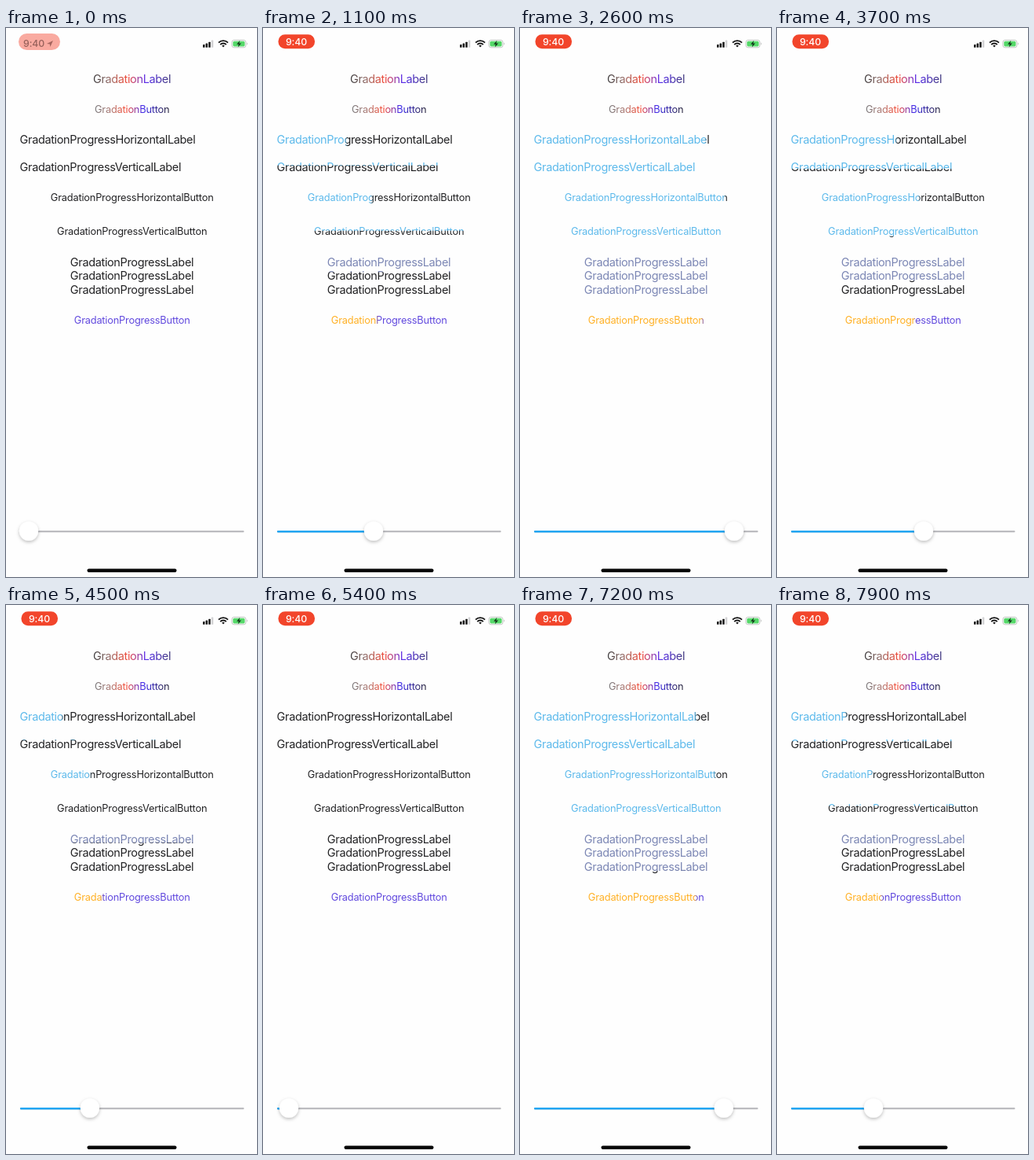
An HTML page for the animation above (8 s loop, 320 px wide and 698 px high).

```html
<!DOCTYPE html>
<html lang="en">
<head>
<meta charset="utf-8">
<title>Gradation progress</title>
<style>
html, body { margin: 0; width: 100%; height: 100%; overflow: hidden; background: #fefefe; }
svg { display: block; width: 320px; height: 698px; }
.soft { filter: blur(.35px); }
text { font-family: Inter, Roboto, sans-serif; fill: #222224; }
.label { font-size: 14.5px; letter-spacing: -.36px; }
.button { font-size: 12.8px; letter-spacing: -.2px; }
.mid { text-anchor: middle; }
.time { font-size: 12.3px; font-weight: 500; letter-spacing: -.1px; }
</style>
</head>
<body>
<svg viewBox="0 0 320 698">
  <defs>
    <linearGradient id="labelFill" gradientUnits="userSpaceOnUse" x1="111" x2="210">
      <stop offset="0" stop-color="#3a3a3c"/>
      <stop offset=".2" stop-color="#94706c"/>
      <stop offset=".45" stop-color="#f44a38"/>
      <stop offset=".68" stop-color="#5a30f0"/>
      <stop offset="1" stop-color="#40387c"/>
    </linearGradient>
    <linearGradient id="buttonFill" gradientUnits="userSpaceOnUse" x1="113" x2="209">
      <stop offset="0" stop-color="#77777a"/>
      <stop offset=".22" stop-color="#b07c76"/>
      <stop offset=".43" stop-color="#f84a34"/>
      <stop offset=".64" stop-color="#3f2cf0"/>
      <stop offset="1" stop-color="#2a2838"/>
    </linearGradient>
    <filter id="shadow" x="-50%" y="-50%" width="200%" height="200%">
      <feDropShadow dx="0" dy="1.8" stdDeviation="2" flood-color="#000" flood-opacity=".27"/>
    </filter>
  </defs>
  <rect width="320" height="698" fill="#fefefe"/>
  <g id="screen" class="soft">
    <g id="pillFaded">
      <rect x="16" y="7" width="53" height="21" rx="10.5" fill="#f9aaa0"/>
      <text class="time" x="22" y="24.4" style="fill:#96605a">9:40</text>
      <path d="M52 20l8-4-3.6 8-.6-3.6z" fill="#a5655e"/>
    </g>
    <g id="pill">
      <rect x="19.5" y="8.3" width="46.5" height="18" rx="8.5" fill="#f2452b"/>
      <text class="time mid" x="42.5" y="21.6" style="fill:#fff">9:40</text>
    </g>

    <g fill="#161616">
      <rect x="251" y="21" width="2.5" height="3.8" rx=".6"/>
      <rect x="254.6" y="19.6" width="2.5" height="5.2" rx=".6"/>
      <rect x="258.2" y="17.7" width="2.5" height="7.1" rx=".6"/>
      <rect x="261.8" y="15.6" width="2.5" height="9.2" rx=".6" fill="#d2d2d4"/>
    </g>
    <g fill="none" stroke="#161616" stroke-width="1.9">
      <path d="M271 18.6a8.6 8.6 0 0 1 12 0"/>
      <path d="M273.2 21.1a5.4 5.4 0 0 1 7.6 0"/>
      <path d="M275.2 22.6a2.6 2.6 0 0 1 3.6 0L277 24.6z" fill="#161616" stroke="none"/>
    </g>
    <rect x="287.9" y="15.4" width="18" height="9.4" rx="2.8" fill="#fff" stroke="#b4b8b4" stroke-width=".8"/>
    <rect x="289.3" y="16.8" width="15.2" height="6.6" rx="1.6" fill="#55d869"/>
    <path d="M307 18.4q1.6 1.7 0 3.4z" fill="#b4b8b4"/>
    <path d="M298.3 15.8l-4.2 4.9h2.6l-1 3.9 4.2-5h-2.7z" fill="#123018"/>

    <text class="label mid" x="160.5" y="69.9" style="fill:url(#labelFill)">GradationLabel</text>
    <text class="button mid" x="160.7" y="108.1" style="fill:url(#buttonFill)">GradationButton</text>

    <rect x="18" y="639.1" width="285.5" height="2.2" rx="1" fill="#bcbcc0"/>
    <rect id="track" x="18" y="639" height="2.6" rx="1" fill="#22a6f2"/>
    <circle id="thumb" cy="639.6" r="12.1" fill="#fff" filter="url(#shadow)"/>
    <rect x="103.5" y="687.4" width="114" height="4.5" rx="2.2" fill="#050505"/>
  </g>
</svg>
<script>
const LOOP = 8000, STEP = 100;
const MIN_X = 29, MAX_X = 292;
const SKY = '#5cb9eb', INK = '#222224';

// thumb position over time: [ms, x]
const path = [
  [0, 29], [150, 30], [1100, 141], [2300, 292], [2600, 273], [3700, 187],
  [5400, 33], [5500, 30], [6500, 238], [6850, 292], [7900, 123], [8000, 109]
];

// the fill edge travels along axis between from and to
const items = [
  { lines: ['GradationProgressHorizontalLabel'], kind: 'label', x: 17.6, y: 147.3,
    axis: 'x', from: 18, to: 242, on: SKY, off: INK },
  { lines: ['GradationProgressVerticalLabel'], kind: 'label', x: 17.6, y: 182.3,
    axis: 'y', from: 167, to: 187, on: SKY, off: INK },
  { lines: ['GradationProgressHorizontalButton'], kind: 'button mid', x: 160.7, y: 220.3,
    axis: 'x', from: 57, to: 265, on: SKY, off: INK },
  { lines: ['GradationProgressVerticalButton'], kind: 'button mid', x: 160.7, y: 263.3,
    axis: 'y', from: 245, to: 278, on: SKY, off: INK },
  { lines: Array(3).fill('GradationProgressLabel'), kind: 'label mid', x: 160.5, y: 302.8,
    axis: 'y', from: 290, to: 342, on: '#7b86b4', off: INK },
  { lines: ['GradationProgressButton'], kind: 'button mid', x: 160.7, y: 375.8,
    axis: 'x', from: 87, to: 235, on: '#ffb024', off: '#6149de' }
];

const screen = document.getElementById('screen');
const [track, thumb, pill, pillFaded] =
  ['track', 'thumb', 'pill', 'pillFaded'].map(id => document.getElementById(id));

function add(parent, tag, attrs) {
  const el = document.createElementNS('http://www.w3.org/2000/svg', tag);
  for (const key in attrs) el.setAttribute(key, attrs[key]);
  return parent.appendChild(el);
}

items.forEach((item, i) => {
  const id = 'progress' + i;
  item.fill = add(document.querySelector('defs'), 'linearGradient',
    { id, gradientUnits: 'userSpaceOnUse', x1: 0, x2: 0, y1: 0, y2: 0 });
  add(item.fill, 'stop', { offset: 0, 'stop-color': item.on });
  add(item.fill, 'stop', { offset: 1, 'stop-color': item.off });
  item.lines.forEach((line, row) => {
    add(screen, 'text', {
      class: item.kind, x: item.x, y: item.y + row * 17.4, style: `fill:url(#${id})`
    }).textContent = line;
  });
});

const clamp = n => Math.max(0, Math.min(1, n));

// flat at turning points, harmonic mean of neighbouring speeds elsewhere
function speed(i) {
  if (i === 0 || i === path.length - 1) return 0;
  const rate = k => (path[k + 1][1] - path[k][1]) / (path[k + 1][0] - path[k][0]);
  const a = rate(i - 1), b = rate(i);
  return a * b <= 0 ? 0 : 2 * a * b / (a + b);
}

function thumbAt(t) {
  const i = Math.max(0, path.findIndex(p => p[0] > t) - 1);
  const [t0, x0] = path[i], [t1, x1] = path[i + 1];
  const d = t1 - t0, u = (t - t0) / d, w = 1 - u;
  return x0 * w * w * (1 + 2 * u) + x1 * u * u * (1 + 2 * w)
    + d * u * w * (w * speed(i) - u * speed(i + 1));
}

function draw(t) {
  const x = thumbAt(t);
  const value = (x - MIN_X) / (MAX_X - MIN_X);
  const progress = clamp(value * 1.15 - .095);
  thumb.setAttribute('cx', x);
  track.setAttribute('width', value > 0 ? x - 18 : 0);
  for (const { fill, axis, from, to } of items) {
    const soft = axis === 'x' ? 2 : .7;
    const edge = from - soft + progress * (to - from + 2 * soft);
    fill.setAttribute(axis + 1, edge - soft);
    fill.setAttribute(axis + 2, edge + soft);
  }
  const shown = clamp(t / 300);
  pill.setAttribute('opacity', shown);
  pillFaded.setAttribute('opacity', 1 - shown);
}

const start = performance.now();
function tick() {
  const t = (performance.now() - start) % LOOP;
  draw(Math.floor(t / STEP) * STEP);
  requestAnimationFrame(tick);
}
tick();
</script>
</body>
</html>
```
